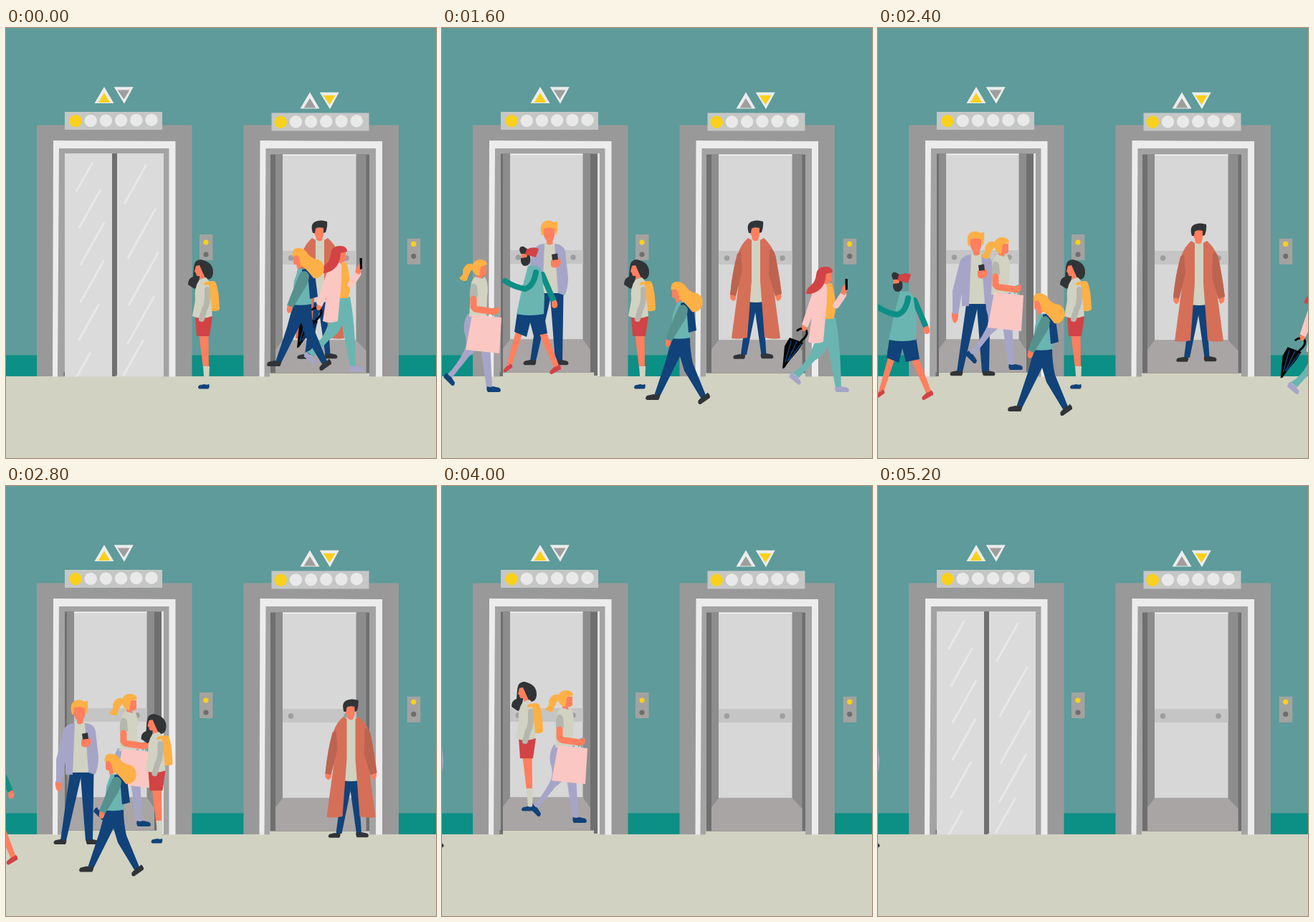
An HTML page for the animation above (5800 ms loop, 600 by 600 pixels).

```html
<!DOCTYPE html>
<html lang="en">
<head>
<meta charset="utf-8">
<title>Elevators</title>
<style>
html, body { margin: 0; height: 100%; overflow: hidden; }
svg { display: block; width: 100vw; height: 100vh; }
</style>
</head>
<body>
<svg id="stage" viewBox="0 0 600 600" preserveAspectRatio="none">
  <clipPath id="opening"><path d="M82 175H220V486.500H82z"/></clipPath>
  <g id="room"></g>
  <g id="people"></g>
</svg>
<script>
const LOOP = 5800, STEP = 200;
const C = {
  skin: '#ff7f5e', navy: '#114279', teal: '#6ab5b2', darkTeal: '#56918e', green: '#0c8f85', red: '#d14345',
  pink: '#fbc7c3', blond: '#fdb045', cream: '#d1d2c1', sleeve: '#b5b7ae', lilac: '#a6a5c8', dark: '#313437',
  coat: '#d56f58', darkCoat: '#bc6450', black: '#050505', yellow: '#f9d11a', pale: '#ececec', grey: '#9e9e9e',
  steel: '#6f6f6f', door: '#dbdbdb', glint: '#e7e7e7',
};
const $ = id => document.getElementById(id);

// Drawing helpers; every colour is a key of C or a plain hex value
const shape = (color, d) => `<path fill="${C[color] || color}" d="${d}"/>`;
const line = (color, width, d) =>
  `<path fill="none" stroke="${C[color]}" stroke-width="${width}" stroke-linecap="round" stroke-linejoin="round" d="${d}"/>`;
const dot = (color, x, y, r) => `<circle fill="${C[color] || color}" cx="${x}" cy="${y}" r="${r}"/>`;
const box = (color, x1, y1, x2, y2) => shape(color, `M${x1} ${y1}H${x2}V${y2}H${x1}z`);
const leg = (color, x1, y1, w1, x2, y2, w2) =>
  shape(color, `M${x1 - w1 / 2} ${y1}h${w1}L${x2 + w2 / 2} ${y2}h${-w2}z`);
const shoe = (color, x, y, dir, turn = 0, size = 1) =>
  `<g transform="translate(${x} ${y}) rotate(${turn}) scale(${dir * size} ${size})">` +
  shape(color, 'M-4 0Q0 2 4 0L13 2Q17 6 13 8H-3Q-6 4 -4 0z') + '</g>';

const arrows = (x, y, up, down) =>
  shape('pale', `M${x} ${y}l13.500 23h-27z`) + shape(up, `M${x} ${y + 8.500}l8.300 13.500h-16.600z`) +
  shape('pale', `M${x + 13.700} ${y + .3}h27l-12.700 23.500z`) + shape(down, `M${x + 18.500} ${y + 4.500}h17l-8 13z`);

function display(x, y, firstLamp) {
  let svg = box('#c5c7c6', x, y, x + 136, y + 25);
  for (let i = 0; i < 6; i++) svg += dot(i ? '#e9e9e9' : 'yellow', firstLamp + 21.200 * i, y + 12.700 - i * .3, 8.700);
  return svg;
}

const callPanel = (x, y, lampY) =>
  box('#a2a3a1', x - 9, y, x + 9.500, y + 36) + dot('yellow', x, lampY, 3.600) + dot(C.steel, x, lampY + 17, 3.600);

const frame = x =>
  box('#999', x, 135.500, x + 216.500, 486) +
  shape('pale', `M${x + 23} 157L${x + 193.500} 158V486.500H${x + 22}z`) +
  shape('#a3a3a3', `M${x + 31} 168H${x + 184.500}V486.500H${x + 29}z`);

// Two edges of the opening, of its side walls and of the back wall
function cabin([x1, x2], [wall1, wall2], [back1, back2], y) {
  const base = y + 305, rail = y + 134.500, floor = y + 259;
  return box('cream', x1 - 1, base, x2, 487) + box('steel', x1, y, x2, base) + box('#8d8d8d', wall1, y, wall2, base) +
    box('#d7d7d7', back1, y, back2, floor) + box('#f7f7f7', back1, y, back2, y + 1.500) +
    shape('#a9a5a5', `M${back1} ${floor}H${back2}L${wall2} ${floor + 15}V${base}H${wall1}V${floor + 13}z`) +
    box('#c5c5c5', back1, rail, back2, rail + 19) +
    dot('grey', back1 + 11.500, rail + 10, 3.800) + dot('grey', back2 - 13.500, rail + 10, 3.800);
}

function glints(count, x, y, gap, growth, length) {
  const middle = count / 2 - .6;
  let d = '';
  for (let i = 0; i < count; i++) {
    const bow = ((i - middle) / middle) ** 2, l = length - 20 * bow;
    d += `M${x - 17 * bow} ${y + gap * i + growth * i * i}l${-.56 * l} ${l}`;
  }
  return line('glint', 3, d);
}

$('room').innerHTML =
  box('#5e9b9a', 0, 0, 600, 600) + box('green', 0, 456.500, 600, 486) + box('cream', 0, 486, 600, 600) +
  frame(43) + box('#e4e4e4', 217, 175, 220, 486) + cabin([82, 217], [85, 207], [95, 196.500], 175.500) +
  box('steel', 80.500, 480, 85, 486) + box('steel', 212, 480, 217, 485) +
  frame(331.500) + cabin([369, 507], [376, 502.500], [386, 488.500], 176.500) +
  arrows(137, 82, 'yellow', 'grey') + display(82, 117, 97) + callPanel(279, 288, 299) +
  arrows(424, 89.500, 'grey', 'yellow') + display(370.500, 118.500, 383.200) + callPanel(568.800, 293.800, 301.300);

const figures = {
  blondMan:
    leg('navy', 145, 368, 17, 127, 465, 8) + leg('navy', 160, 368, 19, 163, 465, 10) +
    shoe('dark', 127, 463, -1, 0, .9) + shoe('dark', 163, 463, 1, 0, .9) +
    shape('skin', 'M116 382h9q1 12-5 15q-5-4-4-15z') +
    shape('cream', 'M142 300H158L162 370H137z') +
    shape('lilac', 'M143 301Q130 302 127 312L117 352V384H125L130 355V373H140z') +
    shape('lilac', 'M157 301Q170 302 172 312L176 348Q176 364 171 373L162 370z') +
    line('#9392b8', 1, 'M128 320L131 345V370M168 318L169 338') +
    shape('skin', 'M152 324L164 321Q168 328 163 333Q156 337 152 332z') + shape('dark', 'M153 316L161 314.500L162 323L154 324z') +
    shape('skin', 'M141 278H158L157 290L154.500 297V301Q150 304 146 301V297Q140 290 141 278z') +
    shape('blond', 'M139 289Q135 274 143 270Q150 267 156 271L161 270Q162 284 159 289L157 280Q148 277 142 280L141 289z'),

  hatMan:
    leg('skin', 108, 424, 10, 93, 473, 7) + leg('skin', 140, 424, 11, 160, 473, 8) +
    shoe('red', 93, 470, -1, -35, .75) + shoe('red', 160, 471, -1, -30, .9) +
    line('green', 8, 'M140 344Q147 360 155 379') + shape('skin', 'M153 382l6-3q4 8 1 11q-5 3-7-2z') +
    shape('navy', 'M105 397L142 396L147 426L128 430L123 411L118 431L101 424z') +
    shape('teal', 'M120 332Q133 329 138 337L143 374L142 399Q122 403 104 399L112 362z') +
    line('green', 8, 'M131 341Q128 360 116 364Q102 362 88 353') +
    shape('skin', 'M111 314H121V326H110z') +
    shape('dark', 'M108 310Q108 304 114 305L120 309L117 315H110zM110 321L118 320L120 314L123 319Q125 332 115 332Q109 330 110 321z') +
    shape('red', 'M118 309Q127 304 135 308L131 320L116 316z'),

  doors: '<g id="leftDoor"></g><g id="rightDoor"></g>',

  coatMan:
    leg('navy', 434, 378, 14, 421, 456, 8) + leg('navy', 441, 378, 13, 449, 456, 7) +
    shoe('dark', 419, 455, -1, 0, .85) + shoe('dark', 449, 454, 1, 0, .9) +
    shape('cream', 'M431 294H445L448 382Q438 384 427 382z') +
    shape('skin', 'M402 371h8q1 9-3 10q-6-1-5-10zM465 371h8q2 8-5 10q-3-3-3-10z') +
    shape('coat', 'M427 293L432 296V352L426 432Q414 435 404 433L414 358L410 374L402 372Q405 340 414 312Q418 301 427 293z') +
    shape('coat', 'M449 293L444 296V352L450 432Q462 435 472 433L462 358L465 374L474 371Q470 335 463 312Q458 301 449 293z') +
    shape('darkCoat', 'M457 309Q463 307 466 320L474 371L465 374L456 344zM417 312L419 338L410 374L402 372Q405 340 412 315z') +
    shape('skin', 'M431 276H444L443 289L441 296Q437 299 433 295L432 290Q427 285 431 276z') +
    shape('dark', 'M428 286Q424 273 432 270Q439 267 448 270Q449 276 446 285L443 286V279Q435 277 432 280L431 286z'),

  phoneWoman:
    line('black', 3, 'M477 473L502 436Q513 427 507 420Q501 418 496 422') +
    shape('black', 'M475 476L478 444L485 432L504 439L497 450z') + line('navy', 1.500, 'M479 466L487 437M482 465L495 438M484 464L501 441') +
    shape('teal', 'M532 404H549Q556 440 557 501H549L538 443Q534 456 520 464L498 488L489 481Q510 470 520 438z') +
    shoe('lilac', 492, 483, 1, 40) + shoe('lilac', 553, 500, 1) +
    shape('blond', 'M535 357L544 356Q550 375 549 396L546 406H533z') +
    line('pink', 9, 'M550 387L560 372') + shape('skin', 'M556 370L559 361L563 357L566 366L562 373z') +
    shape('black', 'M562.500 350H566V365L563 366z') +
    shape('skin', 'M504 413l6 3q-1 8-6 7q-4-3 0-10zM532 341H543L544 351Q541 357 538 355L537 361L528 360z') +
    shape('pink', 'M528 354L537 358Q538 380 535 405L532 438Q520 442 511 438L516 404L510 418L502 414L514 378Q519 360 528 354z') +
    shape('red', 'M522 345Q523 333 535 333Q545 333 545 341L536 343Q535 358 528 364Q520 372 508 371Q508 364 515 359Q521 354 522 345z'),

  bagWoman:
    leg('lilac', 56, 400, 18, 66, 501, 8) +
    shape('lilac', 'M36 399H62L60 440L38 458L14 488L8 483Q20 471 30 452Q37 440 31 424Q29 410 36 399z') +
    shoe('navy', 10, 484, 1, 45) + shoe('navy', 67, 500, 1) +
    shape('skin', 'M50 332H62V343Q60 347 56 346L57 354H47z') +
    shape('cream', 'M46 347L56 350L60 347Q66 360 63 375L62 403H38L40 364Q40 352 46 347z') +
    shape('sleeve', 'M41 358Q45 354 49 361L50 375L39 376Q38 365 41 358z') +
    line('teal', 2.500, 'M71 401L72 392L77 390L75 402') +
    line('skin', 9, 'M44 378V389Q46 393 52 393L73 396') + shape('skin', 'M73 391L79 389L80 395Q77 401 72 399z') +
    shape('pink', 'M42 400L83 404L80 454L33 449z') +
    shape('blond', 'M42 331Q45 323 53 323Q62 323 63 330L54 333L52 346Q45 345 42 337Q37 343 35 352Q29 355 24 349Q31 344 29 338Q33 327 42 329z'),

  brunette:
    leg('skin', 276, 429, 13, 279, 474, 8) + leg('cream', 279.500, 472, 9, 280, 498, 6) + shoe('navy', 280, 497, -1, 0, .8) +
    shape('red', 'M264 402H288L284 430H266z') +
    shape('dark', 'M262 334Q263 323 272 323Q290 327 289 342Q288 352 279 351L270 347Q269 362 263 364L254 358Q254 349 261 347z') +
    shape('skin', 'M265 332L270 331L278 349L272 354L270 346Q265 347 265 342L263 340z') +
    shape('blond', 'M275 357Q284 351 292 354Q297 362 298 393Q292 397 285 394z') +
    shape('cream', 'M270 351L279 348Q286 353 284 366L288 402Q272 408 260 402L264 380Q262 362 270 351z') +
    line('blond', 4, 'M278 357Q283 353 286 361') + line('sleeve', 8, 'M281 365Q282 385 277 392L273 406'),

  backpackWoman:
    shape('navy', 'M321 432H346Q346 450 350 468L368 512L361 516L338 478L332 458L303 516L296 513L312 465z') +
    shoe('dark', 299, 511, -1) + shoe('dark', 367, 511, -1, -35) +
    shape('skin', 'M321 362L332 360L334 380L327 384L325 377Q321 378 321 373z') +
    shape('teal', 'M328 383Q340 380 344 388L347 432Q335 435 319 433L322 400z') +
    shape('navy', 'M333 384Q346 379 351 390L355 422L344 425L342 400Q341 388 333 387z') +
    shape('darkTeal', 'M331 388Q339 383 343 392Q343 403 334 415L320 438L312 434L325 401z') +
    shape('skin', 'M313 434l7 3q-1 8-6 8q-4-3-1-11z') +
    shape('blond', 'M320 366Q318 354 328 354Q337 354 342 363Q347 369 356 370Q366 376 363 388Q358 398 349 396Q337 380 331 379Q331 369 326 364z'),
};

$('people').innerHTML = Object.entries(figures).map(([id, svg]) => `<g id="${id}">${svg}</g>`).join('');
$('doors').setAttribute('clip-path', 'url(#opening)');
$('leftDoor').innerHTML = box('door', 80, 175, 148, 487) + box('steel', 148, 175, 153, 486) + glints(6, 137, 189, 34, 3.800, 58);
$('rightDoor').innerHTML = box('door', 155, 175, 222, 487) + box('steel', 150, 175, 155, 485) + glints(5, 212, 192, 61, 0, 72);

// Turning points of each walk: time, x, y
const walks = {
  blondMan: [[1800, 0, 0], [2400, -13, 15], [3200, -81, 44.500], [4000, -174, 34]],
  hatMan: [[1600, 0, 0], [2400, -89, 36], [3000, -180, 50]],
  coatMan: [[2200, 0, 0], [2400, 10, 4], [3200, 77, 54], [4000, 220, 100]],
  phoneWoman: [[200, -69, -29], [800, -47, -17], [1000, -47, -17], [1600, 0, 0], [2800, 130, 20]],
  bagWoman: [[200, -100, 0], [800, -24, -5], [1200, 9, -10], [1600, 0, 0], [2400, 120, -31], [3800, 120, -38]],
  brunette: [[2400, 0, 0], [3200, -131, -10], [3800, -157, -50]],
  backpackWoman: [[200, 80, -47], [800, 42, -31], [1000, 42, -31], [1600, 0, 0], [2400, -103, 16], [3200, -261, 23], [3800, -400, 40]],
};

const ramp = (t, from, to) => Math.min(1, Math.max(0, (t - from) / (to - from)));
const move = (id, x, y) => $(id).setAttribute('transform', `translate(${x} ${y})`);

function position(points, t) {
  let [, x, y] = points[0];
  for (let i = 1; i < points.length; i++) {
    const [from, x1, y1] = points[i - 1], [to, x2, y2] = points[i], p = ramp(t, from, to);
    x += (x2 - x1) * p;
    y += (y2 - y1) * p;
  }
  return [x, y];
}

// Motion advances in steps, with longer holds near the end.
function stepTime(ms) {
  const t = Math.floor((ms % LOOP) / STEP) * STEP;
  return t === 4200 ? 4000 : Math.min(t, 5200);
}

let shown = -1;
function draw(ms) {
  const t = stepTime(ms);
  if (t === shown) return;
  shown = t;
  for (const id in walks) move(id, ...position(walks[id], t));
  const open = (ramp(t, 200, 800) + ramp(t, 1000, 1600)) / 2 - ramp(t, 4100, 5000);
  move('leftDoor', -74 * open, 0);
  move('rightDoor', 71 * open, 0);
  // The doors hide the first riders while opening and the new ones while closing.
  $('people').insertBefore($('doors'), t < 3000 ? $('coatMan') : null);
}

const start = performance.now();
function tick() {
  draw(performance.now() - start);
  requestAnimationFrame(tick);
}
tick();
</script>
</body>
</html>
```
